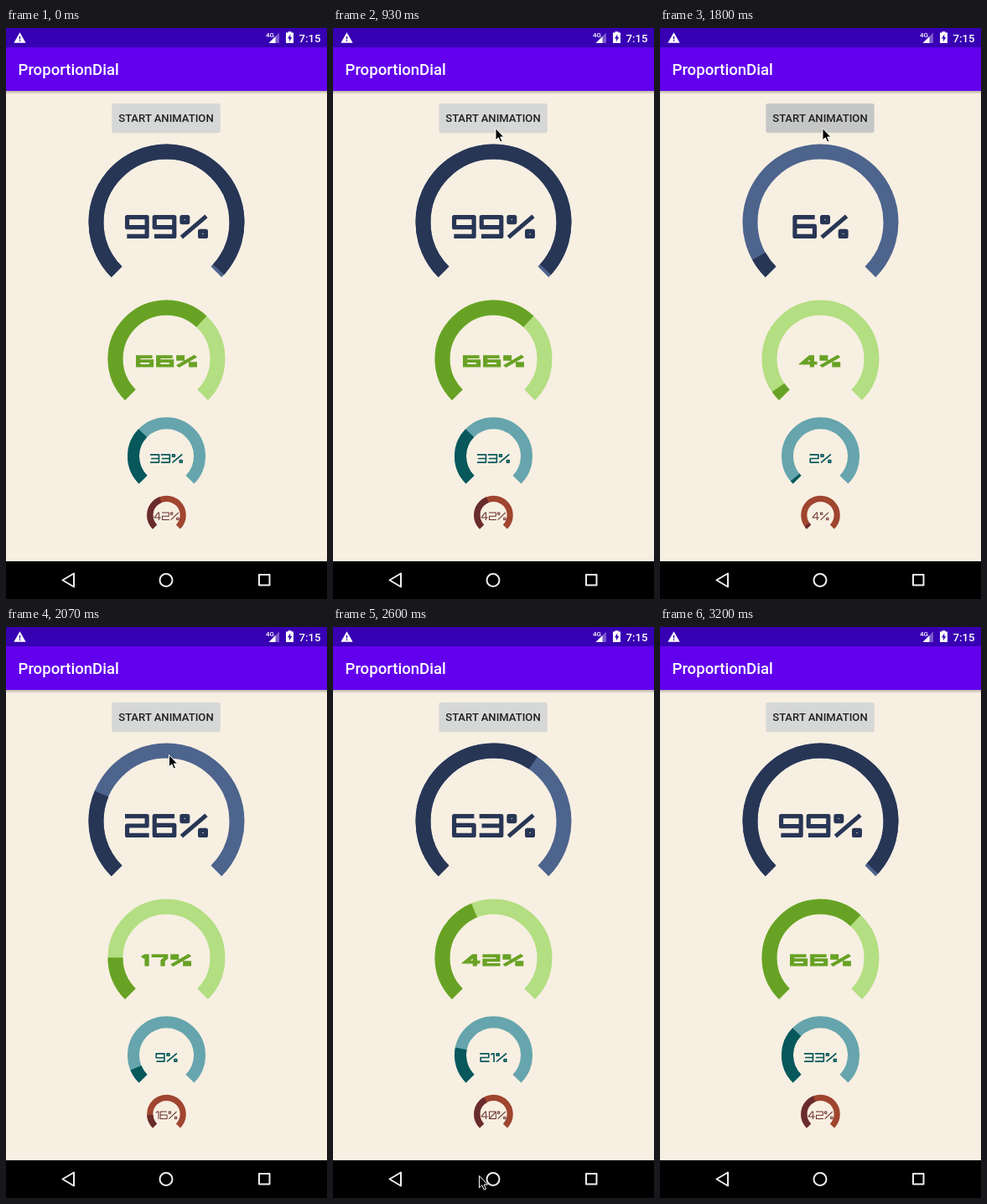
Recreate the animation shown at these times as an HTML page. Size 383 by 681 pixels, loop 4470 ms.

```html
<!DOCTYPE html>
<html lang="en">
<head>
<meta charset="utf-8">
<title>Gauges</title>
<style>
  html, body { margin: 0; width: 100%; height: 100%; overflow: hidden; background: #f7efe2; }
  svg { display: block; width: 383px; height: 681px; }
  text { font-family: Roboto, sans-serif; font-weight: 500; }
  .line { fill: none; }
</style>
</head>
<body>
<svg id="stage" viewBox="0 0 383 681">
  <defs>
    <linearGradient id="shade" x2="0" y2="1">
      <stop stop-opacity=".26"/><stop offset="1" stop-opacity="0"/>
    </linearGradient>
  </defs>
  <rect width="383" height="681" fill="#f7efe2"/>
  <rect y="75" width="383" height="4" fill="url(#shade)"/>
  <rect width="383" height="75" fill="#6200ee"/>
  <rect width="383" height="23" fill="#3700b3"/>

  <!-- status bar -->
  <g fill="#fff">
    <path fill-rule="evenodd" d="M16.5 5.2L23.6 17.8H9.4ZM15.8 10v3.4h1.4V10ZM15.8 14.6v1.4h1.4v-1.4Z"/>
    <text x="310" y="11" font-size="8">4G</text>
    <path d="M326 5.5V18H313.5Z" opacity=".35"/>
    <path d="M321.5 10V18H313.5Z"/>
    <path fill-rule="evenodd" d="M336.5 5.5V4.3h4v1.2h2.5V18h-9V5.5ZM339.3 7.5L336 12.6h2v3.6l3.2-5.2h-1.9Z"/>
    <text x="375.5" y="16.6" font-size="13.2" text-anchor="end">7:15</text>
    <text x="14.5" y="56" font-size="18.6">ProportionDial</text>
  </g>

  <rect x="126.5" y="91" width="129" height="34.2" rx="2" fill="#000" opacity=".1"/>
  <rect id="button" x="126.5" y="90" width="129" height="34.4" rx="2"/>
  <text x="191" y="112" font-size="13.05" text-anchor="middle" fill="#202020">START ANIMATION</text>

  <g id="gauges"></g>

  <!-- navigation bar -->
  <rect y="636" width="383" height="45"/>
  <g class="line" stroke="#eee" stroke-width="2" stroke-linejoin="round">
    <path d="M81 650.5V666.5L67.5 658.5Z"/>
    <circle cx="191" cy="658.5" r="7.5"/>
    <rect x="302" y="652" width="12.5" height="12.5"/>
  </g>

  <path id="cursor" d="M0 0V14.3L3.3 11.3L5.7 16.6L8 15.6L5.7 10.5H10Z" stroke="#fff" stroke-width="1"/>
</svg>
<script>
const LOOP = 4470, START = 1716, CENTER = 191.5;
const $ = id => document.getElementById(id);

function add(parent, tag, attrs) {
  const node = document.createElementNS(parent.namespaceURI, tag);
  for (const key in attrs) node.setAttribute(key, attrs[key]);
  return parent.appendChild(node);
}

// Wide square numerals: [width, centre lines in a unit box], all 28 high.
const GLYPHS = {
  0: [29, 'M0,0L1,0L1,1L0,1ZM.15,.85L.85,.15'],
  1: [12, 'M0,.1L.5,0L1,0L1,1'],
  2: [29, 'M0,0L1,0L1,.5L0,.5L0,1L1,1'],
  3: [29, 'M0,0L1,0L1,1L0,1M.12,.5L1,.5'],
  4: [27, 'M.76,1L.76,0L.62,0L0,.7L1,.7'],
  5: [29, 'M1,0L0,0L0,.45L1,.45L1,1L0,1'],
  6: [29, 'M.9,0L0,0L0,1L1,1L1,.47L0,.47'],
  7: [27, 'M0,0L1,0L1,.25L.75,.55L.75,1'],
  8: [29, 'M0,0L1,0L1,1L0,1ZM0,.5L1,.5'],
  9: [29, 'M1,.53L0,.53L0,0L1,0L1,1L.1,1'],
  '%': [34, 'M0,0L.24,0L.24,.26L0,.26ZM.76,.74L1,.74L1,1L.76,1ZM.95,.02L.05,.98']
};
const GAP = 4, HEIGHT = 28;

function lettering(text, weight) {
  let left = 0, d = '';
  for (const char of text) {
    const [width, shape] = GLYPHS[char];
    d += shape.replace(/([\d.]+),([\d.]+)/g, (_, x, y) =>
      `${left + weight / 2 + x * (width - weight)} ${weight / 2 + y * (HEIGHT - weight)}`);
    left += width + GAP;
  }
  return { d, width: left - GAP };
}

function makeGauge({ y, r, band, back, front, goal, time, top, sx, sy, weight, join }) {
  const group = add($('gauges'), 'g', { class: 'line', role: 'img' });
  const k = r * Math.SQRT1_2;
  const d = `M${CENTER - k} ${y + k}A${r} ${r} 0 1 1 ${CENTER + k} ${y + k}`;
  add(group, 'path', { d, stroke: back, 'stroke-width': band });
  const arc = add(group, 'path', { d, stroke: front, 'stroke-width': band, pathLength: 100 });
  const label = add(group, 'path', {
    stroke: front, 'stroke-width': weight, 'stroke-linejoin': join, 'stroke-linecap': 'square'
  });
  return t => {
    const part = t < START ? 1 : Math.min((t - START) / time, 1);
    const value = goal * part, text = Math.ceil(value) + '%';
    const { d, width } = lettering(text, weight);
    arc.setAttribute('stroke-dasharray', `${value} 200`);
    label.setAttribute('d', d);
    label.setAttribute('transform', `translate(${CENTER - width * sx / 2} ${top}) scale(${sx} ${sy})`);
    group.setAttribute('aria-label', text);
  };
}

const gauges = [
  { y: 231.5, r: 84, band: 18, back: '#4d648d', front: '#283655', goal: 99, time: 1395,
    top: 223, sx: .99, sy: 1, weight: 5.2, join: 'round' },
  { y: 394.5, r: 61, band: 18, back: '#b3de81', front: '#68a225', goal: 66, time: 1395,
    top: 390.3, sx: .73, sy: .51, weight: 7.2, join: 'miter' },
  { y: 510.7, r: 39.5, band: 14, back: '#66a5ad', front: '#07575b', goal: 33, time: 1395,
    top: 508, sx: .39, sy: .39, weight: 4.2, join: 'round' },
  { y: 581, r: 19.7, band: 7.2, back: '#a0452f', front: '#692c2c', goal: 42, time: 944,
    top: 577.5, sx: .305, sy: .34, weight: 3.2, join: 'round' }
].map(makeGauge);

// Pointer: time, x, y of the tip
const PATH = [
  [130, 6, 260], [600, 178, 190], [930, 194, 119.5], [1930, 194, 119.5],
  [2070, 194.5, 152.5], [2330, 209.5, 387], [2600, 174.5, 654.5]
];

function pointerAt(t) {
  const i = Math.max(0, PATH.findIndex(p => p[0] >= t) - 1);
  const at = n => PATH[Math.max(0, Math.min(PATH.length - 1, n))];
  const a = at(i), b = at(i + 1), span = b[0] - a[0], u = (t - a[0]) / span;
  const slope = (n, axis) => (at(n + 1)[axis] - at(n - 1)[axis]) / (at(n + 1)[0] - at(n - 1)[0]) * span;
  return [1, 2].map(axis => {
    if (a[1] === b[1] && a[2] === b[2]) return a[axis];
    const ease = u * u * (3 - 2 * u);
    return a[axis] + (b[axis] - a[axis]) * ease
      + slope(i, axis) * u * (1 - u) ** 2 - slope(i + 1, axis) * u * u * (1 - u);
  });
}

function draw(t) {
  gauges.forEach(update => update(t));

  const press = Math.max(0, Math.min(1, (t - 1500) / 170, (2030 - t) / 220));
  const tone = Math.round(214 - 17 * press);
  $('button').setAttribute('fill', `rgb(${tone},${tone + 1},${tone + 1})`);

  const visible = t >= 130 && t < 2670;
  $('cursor').style.display = visible ? '' : 'none';
  if (visible) $('cursor').setAttribute('transform', `translate(${pointerAt(t)})`);
}

// The picture advances 15 times a second, on 10 ms marks.
const origin = performance.now();
function tick() {
  const t = (performance.now() - origin) % LOOP;
  const step = Math.floor(t * 3 / 200 + .06);
  const time = Math.round(step * 20 / 3) * 10;
  draw(time < 1600 && time > 930 ? 930 : time);
  requestAnimationFrame(tick);
}
tick();
</script>
</body>
</html>
```
